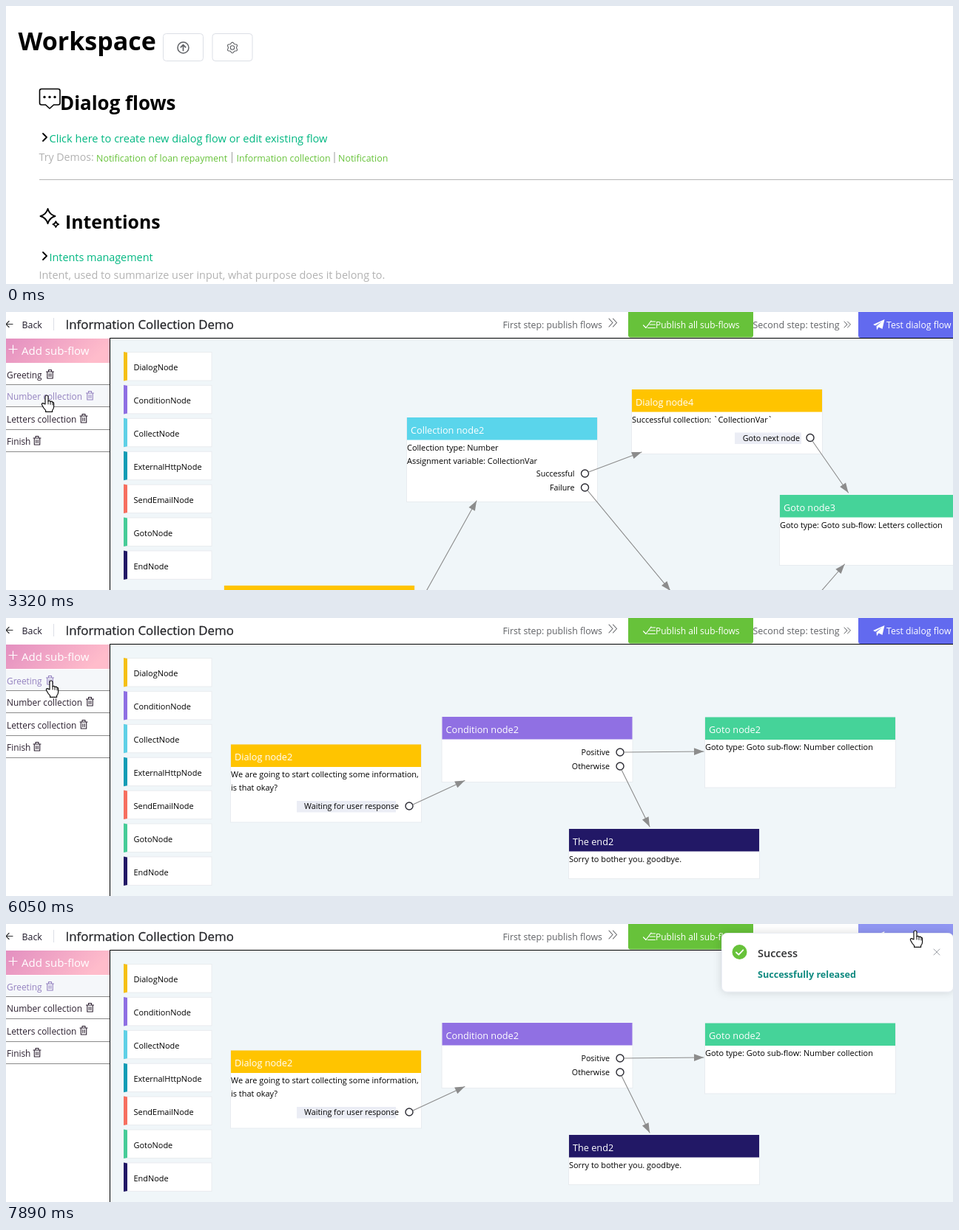
Recreate the animation shown at these times as an HTML page. Size 1280 by 377 pixels, loop 8 s.

```html
<!DOCTYPE html>
<html lang="en">
<head>
<meta charset="utf-8">
<title>Dialog flow editor</title>
<style>
  html, body { margin: 0; width: 100%; height: 100%; overflow: hidden; background: #fff; }
  svg { display: block; width: 100vw; height: 100vh; }
  text { font-family: "Open Sans", "Noto Sans", sans-serif; white-space: pre; }
  .line { fill: none; stroke-linecap: round; stroke-linejoin: round; }
  .row { color: #2c2030; }
  .row.on { color: #9482c0; }
  .row .back { fill: none; }
  .row.on .back { fill: #f5f7fa; }
  #card { filter: drop-shadow(0 0 6px rgba(0, 0, 0, .14)); }
</style>
</head>
<body>
<svg id="stage" viewBox="0 0 1280 377" preserveAspectRatio="none"></svg>
<script>
const YELLOW = '#ffc400', PURPLE = '#9070e3', CYAN = '#5ad5eb', GREEN = '#45d399', NAVY = '#221866';

const text = (x, y, size, str, fill = '#000', extra = '') =>
  `<text x="${x}" y="${y}" font-size="${size}" fill="${fill}" ${extra}>${str}</text>`;
const rect = (x, y, w, h, fill, extra = '') =>
  `<rect x="${x}" y="${y}" width="${w}" height="${h}" fill="${fill}" ${extra}/>`;
const line = (d, color, width = 1, extra = '') =>
  `<path class="line" d="${d}" stroke="${color}" stroke-width="${width}" ${extra}/>`;
const group = (id, body, extra = '') => `<g id="${id}" ${extra}>${body}</g>`;

// Workspace page
function star(x, y, r, width) {
  const k = r * .22;
  return line(`M${x} ${y - r}Q${x + k} ${y - k} ${x + r} ${y}Q${x + k} ${y + k} ${x} ${y + r}` +
    `Q${x - k} ${y + k} ${x - r} ${y}Q${x - k} ${y - k} ${x} ${y - r}z`, '#000', width);
}

function gear(x, y) {
  let d = '';
  for (let i = 0; i < 48; i++) {
    const a = i * Math.PI / 24, r = 6.4 + .9 * Math.cos(6 * a);
    d += `${i ? 'L' : 'M'}${(x + r * Math.sin(a)).toFixed(2)} ${(y + r * Math.cos(a)).toFixed(2)}`;
  }
  return line(d + 'z', '#606266', 1.1) +
    `<circle cx="${x}" cy="${y}" r="2.7" fill="none" stroke="#606266" stroke-width="1.1"/>`;
}

function workspace() {
  const link = '#00b781', demo = '#67c23a', grey = '#b2b2b2';
  const frame = 'rx="4" stroke="#dcdfe6"';
  return text(16.5, 60, 34, 'Workspace', '#000', 'font-weight="700"') +
    rect(212.5, 37.5, 54, 37, '#fff', frame) + rect(279, 37.5, 54, 37, '#fff', frame) +
    '<circle cx="239.5" cy="56.5" r="7.5" fill="none" stroke="#606266" stroke-width="1.5"/>' +
    line('M239.5 60.5V53M236.3 55.8L239.5 52.6L242.7 55.8', '#606266', 1.7) + gear(306, 56.5) +
    line('M48 112.5H70.5Q73 112.5 73 115V131.5Q73 134 70.5 134H64.5L59 139L53.5 134H48Q45.5 134 45.5 131.5V115Q45.5 112.5 48 112.5z', '#000', 1.6) +
    [52, 59, 66].map(x => `<circle cx="${x}" cy="123.5" r="1.7"/>`).join('') +
    text(73, 141, 25.9, 'Dialog flows', '#000', 'font-weight="700"') +
    rect(59, 169, 376, 21, '#00bd7e', 'id="linkGlow"') +
    rect(312, 197, 126, 18, '#00bd7e', 'id="demoGlow"') +
    line('M50 173L55 178L50 183M50 334L55 339L50 344', '#000', 1.8) +
    text(58.5, 185, 14.62, 'Click here to create new dialog flow or edit existing flow', link) +
    text(44.5, 210, 14.2, 'Try Demos:', grey) +
    text(122, 211, 12.45, 'Notification of loan repayment', demo) +
    text(311.5, 211, 12.4, 'Information collection', demo) +
    text(449, 211, 12.45, 'Notification', demo) +
    rect(305, 198, 1, 15, '#a0a0a0') + rect(443.5, 198, 1, 15, '#a0a0a0') +
    rect(45, 235, 1235, 1, '#b5b5b5') +
    star(56.5, 285, 10, 1.9) + star(67.3, 296, 4, 1.7) +
    text(80, 302, 24.8, 'Intentions', '#000', 'font-weight="700"') +
    text(58.5, 346, 14.4, 'Intents management', link) +
    text(44.5, 370, 14.4, 'Intent, used to summarize user input, what purpose does it belong to.', grey);
}

// Editor chrome
function header() {
  return rect(0, 0, 1280, 36, '#fff') +
    line('M9 16.5H.5M4 12.5L0 16.5L4 20.5', '#303133', 1.2) +
    text(21.5, 22, 12.4, 'Back', '#1f1a2a') + rect(64, 8, 1, 17, '#dcdfe6') +
    text(80.5, 23, 16.85, 'Information Collection Demo', '#26272b', 'stroke="#26272b" stroke-width=".3"') +
    text(671.5, 22, 12.3, 'First step: publish flows', '#606266') +
    line('M815 9L820 14.5L815 20M820.5 9L825.5 14.5L820.5 20', '#606266', 1.1) +
    rect(841, -4, 169, 38.5, '#67c23a', 'rx="3"') +
    rect(841, -4, 169, 38.5, '#88c868', 'rx="3" id="publishHover"') +
    line('M861.5 18L865 21.5L872 12M872 13H877.5M870 17H877.5M867.5 21.5H877.5', '#fff', 1.2) +
    text(878, 21.5, 12, 'Publish all sub-flows', '#fff') +
    text(1009.5, 22, 12.5, 'Second step: testing', '#606266') +
    line('M1133 13L1137 17L1133 21M1137.5 13L1141.5 17L1137.5 21', '#606266') +
    rect(1152, -4, 132, 39, '#626aef', 'rx="3"') +
    rect(1152, -4, 132, 39, '#9197f3', 'rx="3" id="testHover"') +
    '<path d="M1172 17L1187.5 10L1184.5 23L1179.5 20.5L1177 24.5L1176.5 19.2L1184 13L1175 18.6z" fill="#fff"/>' +
    text(1190, 21.5, 12.2, 'Test dialog flow', '#fff');
}

function palette() {
  const kinds = [['Dialog', '#f5c016'], ['Condition', '#8e6fe3'], ['Collect', '#5ed0e6'],
    ['ExternalHttp', '#119cb5'], ['SendEmail', '#f66f5f'], ['Goto', '#46cc98'], ['End', NAVY]];
  return kinds.map(([name, color], i) => {
    const y = 54.5 + i * 44.9;
    return rect(159.5, y, 118.5, 38.5, '#fff', 'stroke="#e9ecef"') +
      `<path d="M159 ${y - .5}l5 1v37.5l-5 1z" fill="${color}"/>` +
      text(172.5, y + 24.7, 10.95, name + 'Node');
  }).join('');
}

const trash = (x, y) =>
  line(`M${x} ${y + 2.5}h10M${x + 3} ${y + 2}v-2h4v2M${x + 1.3} ${y + 3}v8.5h7.4v-8.5M${x + 3.8} ${y + 5}v4M${x + 6.2} ${y + 5}v4`, 'currentColor', 1.1);

function rows() {
  return [['Greeting', 70, 28, 90, 54.5], ['Number collection', 99, 29, 119, 108.5],
    ['Letters collection', 129, 30, 150, 100], ['Finish', 160, 29, 180, 37]]
    .map(([name, top, h, base, icon]) => '<g class="row">' +
      `<rect class="back" y="${top}" width="140" height="${h}"/>` +
      text(1, base, 11.9, name, 'currentColor') + trash(icon, base - 11.5) +
      rect(0, top + h, 140, 1, '#8a8a8a') + '</g>').join('');
}

function editor() {
  return rect(0, 0, 1280, 377, '#fff') + rect(140, 36, 1140, 341, '#f0f6f9') +
    palette() + group('flows', flows().map(f => `<g>${f}</g>`).join('')) +
    header() + rect(140, 35, 1140, 1, '#000') + rect(140, 35, 1, 342, '#000') +
    rect(0, 36, 140, 33, 'url(#pink)') + line('M4 50.5H15M9.5 45V56', '#fff', 1.2) +
    text(21, 58, 15, 'Add sub-flow', '#fff') + group('rows', rows());
}

// Flow diagrams
function node(x, y, h, color, title, lines = []) {
  return rect(x - .5, y + .5, 258, h, '#fff', 'stroke="#e8ecf0"') + rect(x, y, 257, 30.5, color) +
    text(x + 5, y + 21.5, 12.7, title, '#fff') +
    lines.map((s, i) => text(x, y + 44.5 + i * 18, 10.95, s)).join('');
}

function port(x, y, label, boxX, boxW) {
  return (boxX ? rect(boxX, y - 7, boxW, 15.5, '#ebedf5') : '') +
    text(x - 14, y + 4, 10.7, label, '#000', 'text-anchor="end"') +
    `<circle cx="${x}" cy="${y}" r="5" fill="#fff" stroke="#2b2b33" stroke-width="1.4"/>`;
}

function arrow(x1, y1, x2, y2) {
  const a = Math.atan2(y2 - y1, x2 - x1) * 180 / Math.PI;
  return line(`M${x1} ${y1}L${x2} ${y2}`, '#8c8c8c', 1.1) +
    `<path d="M0 0L-13 -4.8V4.8z" fill="#8c8c8c" transform="translate(${x2} ${y2}) rotate(${a})"/>`;
}

function collecting(dx, dy, kind, next) {
  return `<g transform="translate(${dx} ${dy})">` +
    node(295, 371, 105, YELLOW, 'Dialog node3') +
    node(542, 143, 114, CYAN, 'Collection node2', ['Collection type: ' + kind, 'Assignment variable: CollectionVar']) +
    port(782.5, 219, 'Successful') + port(782.5, 238, 'Failure') +
    node(846, 105, 87, YELLOW, 'Dialog node4', ['Successful collection: `CollectionVar`']) +
    port(1087, 170.5, 'Goto next node', 985, 90) +
    node(1046, 248, 95, GREEN, 'Goto node3', ['Goto type: Goto sub-flow: ' + next]) +
    arrow(545, 420, 636, 256) + arrow(787.5, 217, 859, 190) + arrow(786, 242, 898, 378) +
    arrow(1090, 175, 1138.5, 245) + arrow(1066, 420, 1133.5, 342) + '</g>';
}

function flows() {
  const greeting =
    node(304, 171.5, 105, YELLOW, 'Dialog node2', ['We are going to start collecting some information,', 'is that okay?']) +
    port(545, 255, 'Waiting for user response', 393, 134) +
    node(589.5, 134, 88, PURPLE, 'Condition node2') +
    port(830, 182, 'Positive') + port(830, 201, 'Otherwise') +
    node(945, 134.5, 95, GREEN, 'Goto node2', ['Goto type: Goto sub-flow: Number collection']) +
    node(761, 286, 67, NAVY, 'The end2', ['Sorry to bother you. goodbye.']) +
    arrow(550, 253, 620, 220.5) + arrow(836, 182, 943, 181) + arrow(832, 206, 870, 283);
  const finish = node(485, 219, 86, NAVY, 'The end3', ['Information collection has been completed, thank', 'you']);
  return [greeting, collecting(0, 0, 'Number', 'Letters collection'),
    collecting(-30, 20, 'Letter', 'Finish'), finish];
}

function notice() {
  return rect(967.5, 12.5, 313, 79.5, '#fff', 'rx="7" stroke="#ebeef5" id="card"') +
    '<circle cx="991.5" cy="38" r="10" fill="#67c23a"/>' +
    line('M987 38.5L990.3 41.7L996.3 35.3', '#fff', 1.8) +
    text(1016, 45, 14.5, 'Success', '#303133', 'font-weight="600"') +
    text(1016, 72.5, 12.6, 'Successfully released', '#0f8a80', 'font-weight="700"') +
    line('M1254 34L1262 42M1262 34L1254 42', '#a0a3a9');
}

function pointer() {
  const shape = (id, d, more = '') =>
    group(id, `<path d="${d}" fill="#fff" stroke="#111" stroke-width="1.2" stroke-linejoin="round"/>` + more);
  return group('ring', '<circle r="11" fill="#f4e51e" opacity=".75"/>') + group('cursor',
    shape('arrow', 'M0 0v17l4-3.8 2.6 6 2.6-1.2-2.6-5.8h5.6z') +
    shape('hand', 'M-1 9V-1a2 2 0 0 1 4 0v6q2-1.4 3 .6q2-1 3 .8q1.6-.6 1.6 2v4q0 3-2 5v2h-9v-2q-3-3-5-7.4q-.8-2.4 1.4-2.4z',
      line('M3 5v4M6 6v3.4M9 7v3', '#111')) +
    shape('grab', 'M-4.5 2.5L-6.5-.6q-1-2 .8-2.3l2.2 2.4-1.6-5q.2-1.8 1.9-1l1.4 4.2-.4-6q1-1.6 2.2 0l.7 5.6 1-5.2q1.4-1 2.1.5l-.4 5.4 1.4-3.2q1.6-.6 1.8 1l-1.5 6.4-1.7 3.2v2.6h-8z'));
}

document.getElementById('stage').innerHTML =
  '<defs><linearGradient id="pink" x2="1" y2=".25"><stop stop-color="#e38fc0"/><stop offset="1" stop-color="#ffbccb"/></linearGradient></defs>' +
  group('workspace', workspace()) + group('editor', editor()) + group('notice', notice()) + pointer();

// Motion
const LOOP = 8000;
// start, end, then from, control and to points
const moves = [
  [180, 880, 1212, 347, 420, 50, 265, 174.5],
  [1010, 1330, 265, 174.5, 300, 206, 363.5, 206.5],
  [2400, 2980, 363.5, 206.5, 200, 150, 54, 116],
  [3380, 3880, 54, 116, 62, 136, 56, 152],
  [3949, 3950, 56, 152, 55, 153, 55, 153],
  [4380, 4620, 55, 153, 68, 168, 76, 175],
  [5080, 5570, 76, 175, 87.5, 155, 60, 88],
  [6060, 6630, 60, 88, 560, 100, 920, 17],
  [7100, 7490, 920, 17, 1060, 110, 1215, 44],
  [7510, 7800, 1215, 44, 1228, 40, 1228, 12]
];
const clicks = [1900, 3080, 4150, 4820, 5850, 6890];
const CLICK = 140;

const $ = id => document.getElementById(id);
const show = (el, on) => el.setAttribute('display', on ? 'inline' : 'none');
const fade = (id, v) => $(id).setAttribute('opacity', v);
const place = (id, x, y) => $(id).setAttribute('transform', `translate(${x} ${y})`);
const ramp = (t, start, span) => Math.min(1, Math.max(0, (t - start) / span));
const smooth = u => u * u * (3 - 2 * u);

function position(t) {
  const [a, b, x0, y0, x1, y1, x2, y2] = moves.filter(m => m[0] <= t).pop() || moves[0];
  const u = smooth(ramp(t, a, b - a)), v = 1 - u;
  return [v * v * x0 + 2 * u * v * x1 + u * u * x2, v * v * y0 + 2 * u * v * y1 + u * u * y2];
}

function cursorKind(t, x, y) {
  if (t < 2240) {
    const onLink = x > 59 && x < 435 && y > 169 && y < 190;
    const onDemo = x > 312 && x < 438 && y > 197 && y < 215;
    return onLink || onDemo ? 'hand' : 'arrow';
  }
  if (t > 7200 && x > 967 && y > 12.5) return 'arrow';
  if (y < 36) return (x > 841 && x < 1010) || x > 1152 ? 'hand' : 'arrow';
  if (x < 140) return y < 190 ? 'hand' : 'arrow';
  return 'grab';
}

function draw(t) {
  const inEditor = t >= 2240;
  show($('workspace'), !inEditor);
  show($('editor'), inEditor);
  fade('linkGlow', .2 * Math.min(ramp(t, 880, 400), 1 - ramp(t, 1110, 400)));
  fade('demoGlow', .2 * ramp(t, 1230, 400));

  const selected = t < 3220 ? 0 : t < 4290 ? 1 : t < 4960 ? 2 : t < 5990 ? 3 : 0;
  show($('rows'), t >= 2430);
  show($('flows'), t >= 2500);
  [...$('rows').children].forEach((el, i) => el.classList.toggle('on', i === selected));
  [...$('flows').children].forEach((el, i) => show(el, i === selected));

  fade('publishHover', Math.min(ramp(t, 6640, 100), 1 - ramp(t, 7150, 100)));
  fade('testHover', ramp(t, 7770, 110));
  const slide = smooth(ramp(t, 7060, 300));
  show($('notice'), slide > 0);
  fade('notice', slide);
  place('notice', 330 * (1 - slide), 0);

  const [x, y] = position(t), kind = cursorKind(t, x, y);
  show($('cursor'), t >= 180);
  place('cursor', x, y);
  for (const id of ['arrow', 'hand', 'grab']) show($(id), id === kind);
  show($('ring'), clicks.some(c => t >= c && t < c + CLICK));
  place('ring', x, y);
}

const start = performance.now();
function tick() {
  draw((performance.now() - start) % LOOP);
  requestAnimationFrame(tick);
}
tick();
</script>
</body>
</html>
```
